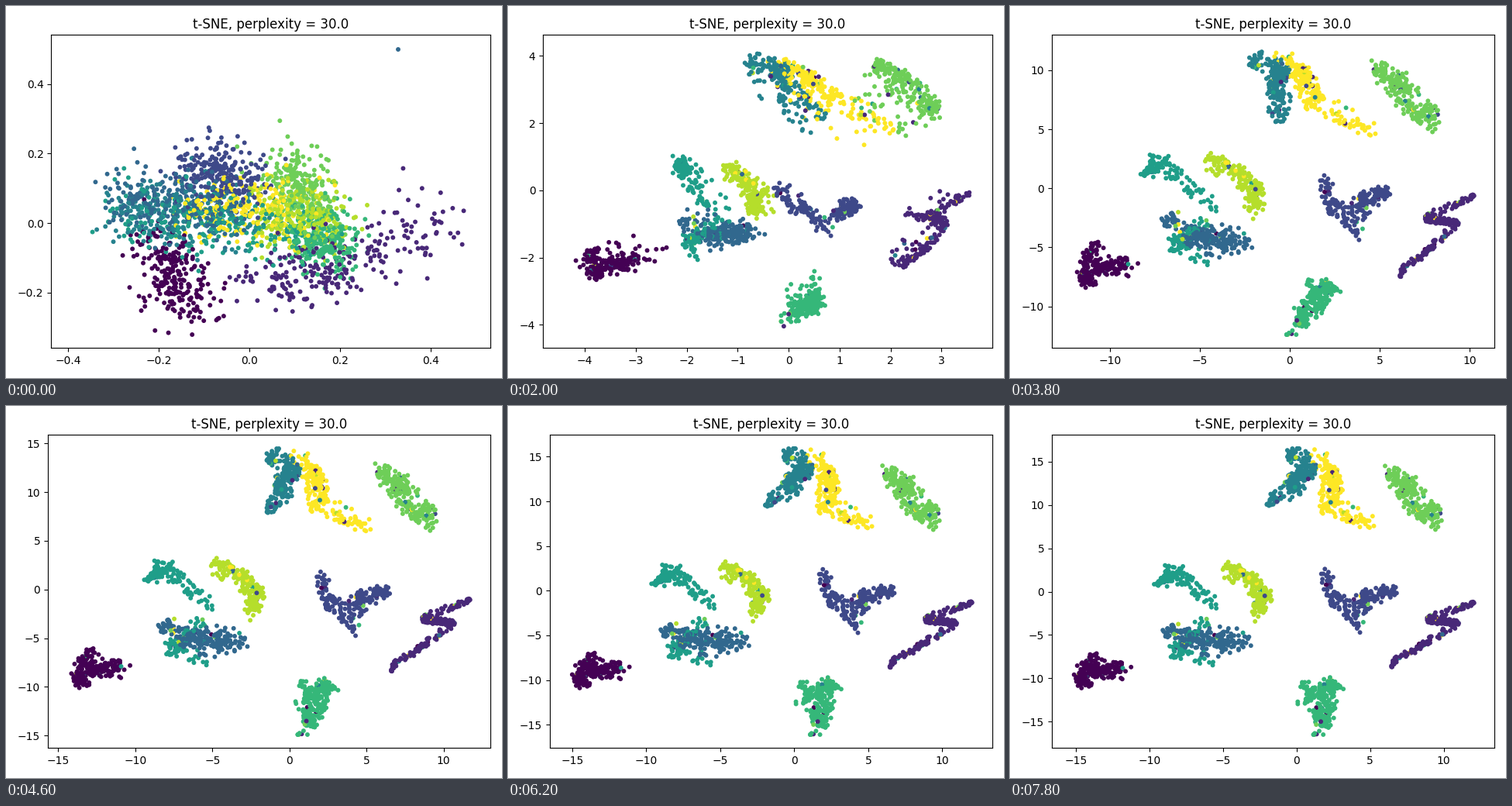
A matplotlib script that plays this animation: 640x480 px, repeating every 8000 ms.

```python
import numpy as np
import matplotlib.pyplot as plt
from matplotlib.animation import FuncAnimation
from matplotlib.transforms import IdentityTransform

W, H, FRAMES, STEP = 640, 480, 40, 200
PER_CLASS, CLUMPS = 235, 32
SPROUT_AT, SPLIT_AT = 6, 13
MIDDLE = np.array([400, 250])
rng = np.random.default_rng(11)

# Axis limits at a few moments; they grow geometrically in between.
TIMES = [0, 6, 13, 19, 23, 31, 39]
LEFT = [-0.4376, -2.074, -9.07, -13.23, -15.68, -16.52, -16.66]
RIGHT = [0.532, 1.5195, 8.26, 11.38, 13.04, 13.38, 13.45]
BOTTOM = [-0.36, -1.953, -9.05, -13.52, -16.28, -17.6, -18.05]
TOP = [0.542, 1.877, 9.10, 12.99, 15.88, 17.43, 18.1]

classes = []


def along(knots, t):
    """Points of the polyline (x0, y0, x1, y1, ...) at t in 0..1."""
    k = np.reshape(knots, (-1, 2))
    u = np.linspace(0, 1, len(k))
    return np.c_[np.interp(t, u, k[:, 0]), np.interp(t, u, k[:, 1])]


def gather(t, knots):
    """Ease t so that points crowd around the knots of a path."""
    legs = len(knots) // 2 - 1
    leg, f = np.divmod(t * legs, 1)
    return (leg + f * f * (3 - 2 * f)) / legs


def clumps():
    """Path positions and offsets of points that sit in small clumps."""
    which = rng.integers(0, CLUMPS, PER_CLASS)
    ang = rng.uniform(0, 2 * np.pi, CLUMPS)
    centre = np.c_[np.cos(ang), np.sin(ang)] * np.sqrt(rng.random((CLUMPS, 1)))
    t = rng.random(CLUMPS)[which] + rng.normal(0, 0.04, PER_CLASS)
    offset = centre[which] + rng.normal(0, 0.32, (PER_CLASS, 2))
    return np.clip(t, 0, 1), offset


def digit(width, cloud, sprout, split, final):
    """One class: a cloud that sprouts, splits off and settles."""
    t, offset = clumps()
    tails = rng.standard_t(5, (PER_CLASS, 2))
    lag = 0.6 * rng.random((PER_CLASS, 1)) ** 6
    early = along(sprout, t) + tails * width * 0.65
    classes.append((
        np.full(PER_CLASS, len(classes)),
        along(cloud, rng.random(PER_CLASS)) + rng.normal(0, 21, (PER_CLASS, 2)),
        early + (MIDDLE - early) * lag,
        along(split, gather(t, split)) + offset * width * 1.15,
        along(final, gather(t, final)) + offset * width,
    ))


digit(10, cloud=(190, 308, 240, 390),
      sprout=(95, 350, 125, 335, 160, 338),
      split=(92, 315, 112, 283, 103, 355, 125, 328, 168, 329),
      final=(88, 335, 110, 318, 92, 357, 118, 340, 150, 338))
digit(4, cloud=(320, 360, 420, 340, 565, 268),
      sprout=(498, 309, 528, 309, 565, 270, 590, 250),
      split=(515, 357, 545, 322, 575, 280, 535, 272, 599, 234),
      final=(492, 332, 530, 308, 576, 280, 540, 275, 599, 253))
digit(9, cloud=(240, 200, 320, 235),
      sprout=(262, 235, 330, 255, 400, 272, 420, 285),
      split=(402, 234, 415, 268, 445, 298, 455, 252, 478, 240),
      final=(404, 216, 420, 248, 448, 280, 460, 245, 500, 238))
digit(13, cloud=(135, 250, 290, 260),
      sprout=(255, 303, 285, 295, 330, 275),
      split=(203, 262, 240, 298, 270, 300, 315, 307),
      final=(205, 292, 225, 302, 265, 303, 315, 300))
digit(11, cloud=(150, 262, 310, 270),
      sprout=(378, 60, 410, 72, 460, 105),
      split=(270, 81, 313, 88, 322, 118, 360, 172),
      final=(370, 60, 385, 82, 368, 102, 335, 127))
digit(9, cloud=(150, 270, 390, 295),
      sprout=(310, 190, 275, 300, 240, 320),
      split=(156, 203, 172, 188, 265, 270, 210, 298, 250, 330),
      final=(190, 230, 212, 214, 265, 262, 212, 317, 265, 330))
digit(12, cloud=(385, 288, 430, 308),
      sprout=(386, 412, 390, 398, 400, 388),
      split=(395, 365, 405, 378, 365, 390, 330, 413),
      final=(378, 370, 415, 370, 402, 395, 402, 415))
digit(13, cloud=(362, 205, 395, 270),
      sprout=(500, 75, 540, 85, 568, 115),
      split=(455, 72, 485, 92, 510, 122, 540, 148),
      final=(490, 85, 512, 102, 523, 125, 548, 144))
digit(10, cloud=(335, 260, 420, 278),
      sprout=(350, 232, 340, 265, 325, 290),
      split=(235, 190, 275, 205, 302, 227, 320, 265),
      final=(282, 212, 310, 224, 325, 245, 322, 272))
digit(11, cloud=(240, 265, 380, 260),
      sprout=(388, 68, 460, 98, 535, 143),
      split=(290, 73, 335, 83, 375, 115, 465, 170),
      final=(392, 63, 415, 92, 415, 128, 462, 150))

labels, cloud, sprout, split, final = map(np.concatenate, zip(*classes))
cloud[np.argmax(labels == 3)] = 506, 56  # the lone outlier

# Mix the drawing order and let a few points join the wrong cluster.
order = rng.permutation(len(labels))
labels, cloud, sprout, split, final = (
    a[order] for a in (labels, cloud, sprout, split, final))
strays = np.flatnonzero(rng.random(len(labels)) < 0.06)
hosts = rng.permutation(strays)
for stage in (sprout, split, final):
    stage[strays] = stage[hosts]

fig, ax = plt.subplots(figsize=(W / 100, H / 100), dpi=100)
dots = ax.scatter(cloud[:, 0], H - cloud[:, 1], c=labels, cmap="viridis",
                  vmin=0, vmax=9, s=18, linewidths=0,
                  transform=IdentityTransform())
ax.set_title("t-SNE, perplexity = 30.0")


def limit(keys, i):
    return np.sign(keys[0]) * np.exp(np.interp(i, TIMES, np.log(np.abs(keys))))


def mix(a, b, k):
    return a + (b - a) * k


def positions(i):
    if i <= SPROUT_AT:
        p = mix(cloud, sprout, i / SPROUT_AT)
    elif i <= SPLIT_AT:
        p = mix(sprout, split, (i - SPROUT_AT) / (SPLIT_AT - SPROUT_AT))
    else:
        p = mix(split, final, 1 - np.exp(-((i - SPLIT_AT) / 7.5) ** 1.5))
    return np.clip(p, (79, 55), (600, 424))


def draw(i):
    p = positions(i)
    dots.set_offsets(np.c_[p[:, 0], H - p[:, 1]])
    ax.set_xlim(limit(LEFT, i), limit(RIGHT, i))
    ax.set_ylim(limit(BOTTOM, i), limit(TOP, i))
    fig.tight_layout()
    return [dots]


anim = FuncAnimation(fig, draw, frames=FRAMES, interval=STEP, repeat=True)
plt.show()
```
